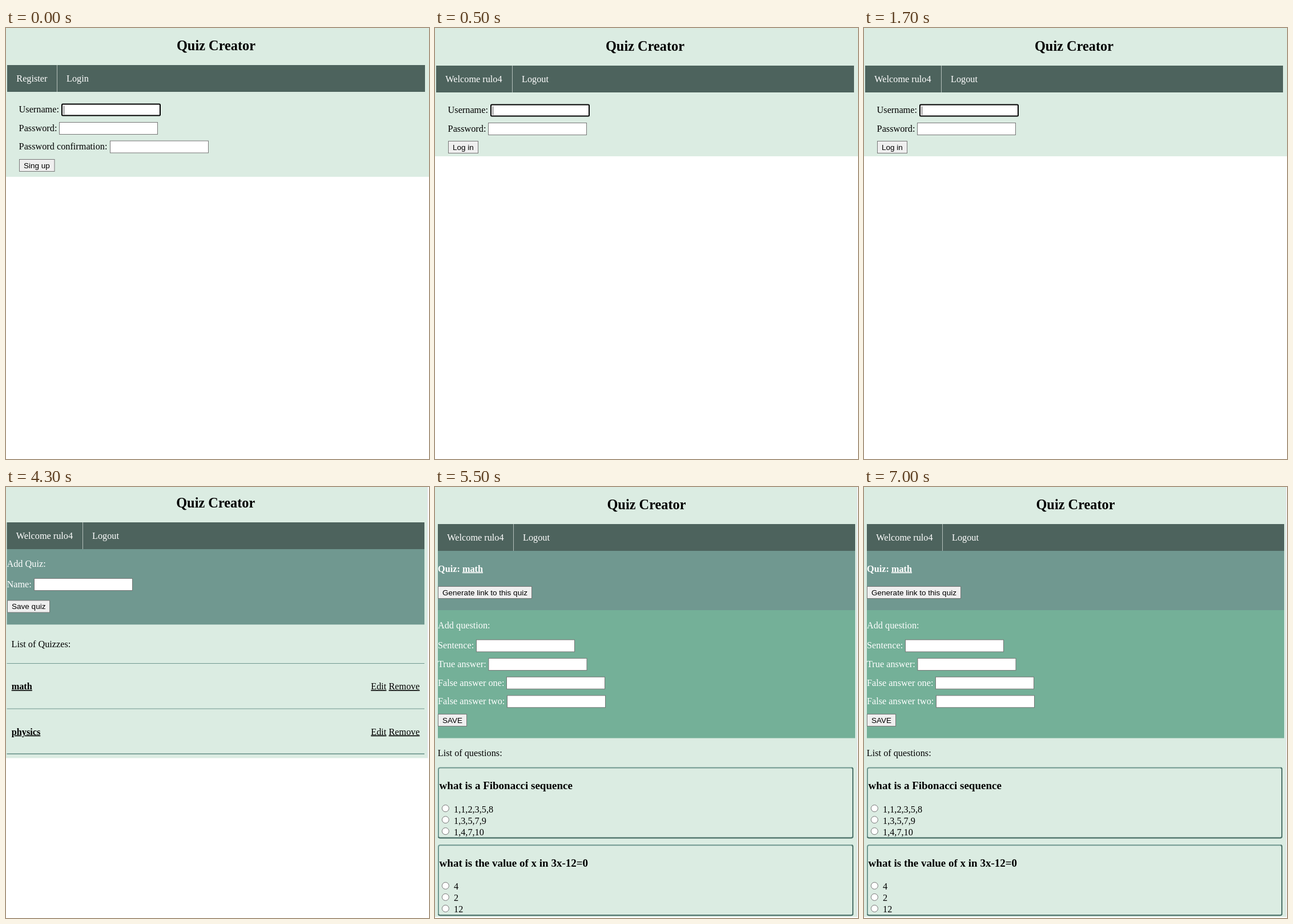
Write an HTML page that moves like this. It is 741 by 756 pixels and loops after 8 s.

```html
<!DOCTYPE html>
<html lang="en">
<head>
<meta charset="utf-8">
<title>Quiz Creator</title>
<style>
  html, body { margin: 0; width: 100%; height: 100%; overflow: hidden; background: #fff; }
  svg { display: block; }
  text { font: 16.25px "Liberation Serif", "Times New Roman", serif; }
  .title { font-size: 24.35px; font-weight: bold; text-anchor: middle; }
  .bold { font-weight: bold; }
  .question { font-size: 19px; font-weight: bold; }
  .label { font: 13.54px "Liberation Sans", Arial, sans-serif; }
  .link { text-decoration: underline; }
  .white { fill: #fff; }
</style>
</head>
<body>
<svg id="stage" width="741" height="756" viewBox="0 0 741 756"></svg>
<script>
const MINT = '#dbece2', DARK = '#4d635d', TEAL = '#709890', GREEN = '#74b098', GRAY = '#767676';

const rect = (x, y, w, h, fill, extra = '') =>
  `<rect x="${x}" y="${y}" width="${w}" height="${h}" fill="${fill}" ${extra}/>`;
const text = (x, y, content, style = '') => `<text x="${x}" y="${y}" class="${style}">${content}</text>`;
const outlined = (x, y, w, h, fill) =>
  rect(x + .5, y + .5, w - 1, h - 1, fill, `stroke="${GRAY}"`);
const input = (x, y) => outlined(x, y, 173, 22, '#fff');
const focusedInput = (x, y) =>
  rect(x, y, 172, 20, '#fff', 'rx="1.5" stroke="#000" stroke-width="2"') +
  rect(x + 3, y + 3, 1, 15, '#444');
const button = (x, y, w, label) =>
  outlined(x, y, w, 22, '#efefef') + text(x + 8, y + 15.6, label, 'label');

const header = (x, y, width, titleY, split, first, second) =>
  text(x + width / 2, titleY, 'Quiz Creator', 'title') +
  rect(x, y, width, 47, DARK) + rect(split, y, 1, 47, '#b4c0bb') +
  text(x + 16.3, y + 29, first, 'white') + text(split + 17, y + 29, second, 'white');

const credentials = y =>
  text(22.6, y, 'Username:') + focusedInput(98, y - 14.5) +
  text(22.6, y + 32.6, 'Password:') + input(93, y + 17);

const quizRow = (y, name) =>
  text(9.7, y, name, 'bold link') + text(639.3, y, 'Edit', 'link') + text(670.5, y, 'Remove', 'link');

const questionBox = (y, question, answers) =>
  rect(6, y + 1, 726, 123, 'none', `rx="3" stroke="${TEAL}" stroke-width="2"`) +
  `<path d="M6 ${y + 122}q0 2 3 2h720q3 0 3-3v-117q0-3-2-3" fill="none" stroke="#4f736b" stroke-width="2"/>` +
  text(7.6, y + 38.5, question, 'question') +
  answers.map((answer, i) =>
    `<circle cx="18.4" cy="${y + 72.2 + i * 20}" r="6" fill="#fff" stroke="${GRAY}"/>` +
    text(33, y + 79.2 + i * 20, answer)).join('');

const welcome = 'Welcome rulo4';

const register =
  rect(0, 0, 741, 261, MINT) +
  header(2, 65, 732, 39, 89, 'Register', 'Login') +
  credentials(148) +
  text(22.6, 213.3, 'Password confirmation:') + input(182, 197.5) +
  button(23, 230, 62.5, 'Sing up');

const login =
  rect(0, 0, 741, 225, MINT) +
  header(2, 66, 732, 40, 135, welcome, 'Logout') +
  credentials(149) +
  button(23, 198, 53, 'Log in');

const quizzes =
  rect(0, 0, 738, 475.5, MINT) + rect(738, 0, 1, 475.5, '#e2e2ea') +
  header(1.5, 62, 731.5, 36, 134, welcome, 'Logout') +
  rect(1.5, 109, 731.5, 132.3, TEAL) +
  text(1.5, 140, 'Add Quiz:', 'white') +
  text(1.5, 176, 'Name:', 'white') + input(49, 160) +
  button(2, 198.5, 75, 'Save quiz') +
  text(9.5, 281, 'List of Quizzes:') +
  rect(1.5, 309, 731.5, 1, TEAL) + quizRow(355, 'math') +
  rect(1.5, 388.5, 731.5, 1, TEAL) + quizRow(434.6, 'physics') +
  rect(1.5, 467.3, 731.5, 1.7, TEAL);

const fields = [['Sentence:', 72], ['True answer:', 93.5], ['False answer one:', 125], ['False answer two:', 126]];
const questions =
  rect(0, 0, 739, 754, MINT) + rect(739, 0, 1, 754, '#e2e6ea') +
  header(5, 65, 731, 39, 137, welcome, 'Logout') +
  rect(5, 112, 731, 104.2, TEAL) +
  text(5, 148.5, 'Quiz: <tspan class="link">math</tspan>', 'bold white') +
  button(5, 174, 165, 'Generate link to this quiz') +
  rect(5, 216, 731, 224.5, GREEN) +
  text(5, 247.7, 'Add question:', 'white') +
  fields.map(([label, x], i) =>
    text(5, 283.3 + i * 32.6, label, 'white') + input(x, 267.5 + i * 32.6)).join('') +
  button(5, 398, 51, 'SAVE') +
  text(4.8, 472, 'List of questions:') +
  questionBox(491.5, 'what is a Fibonacci sequence', ['1,1,2,3,5,8', '1,3,5,7,9', '1,4,7,10']) +
  questionBox(627.2, 'what is the value of x in 3x-12=0', ['4', '2', '12']);

const stage = document.getElementById('stage');
stage.innerHTML = [register, login, quizzes, questions].map(scene => `<g>${scene}</g>`).join('');
const scenes = [...stage.children];
const starts = [0, 500, 2500, 5500];
const origin = performance.now();

function draw() {
  const time = (performance.now() - origin) % 8000;
  const current = starts.filter(start => start <= time).length - 1;
  scenes.forEach((scene, i) => { scene.style.display = i === current ? '' : 'none'; });
  requestAnimationFrame(draw);
}
draw();
</script>
</body>
</html>
```
